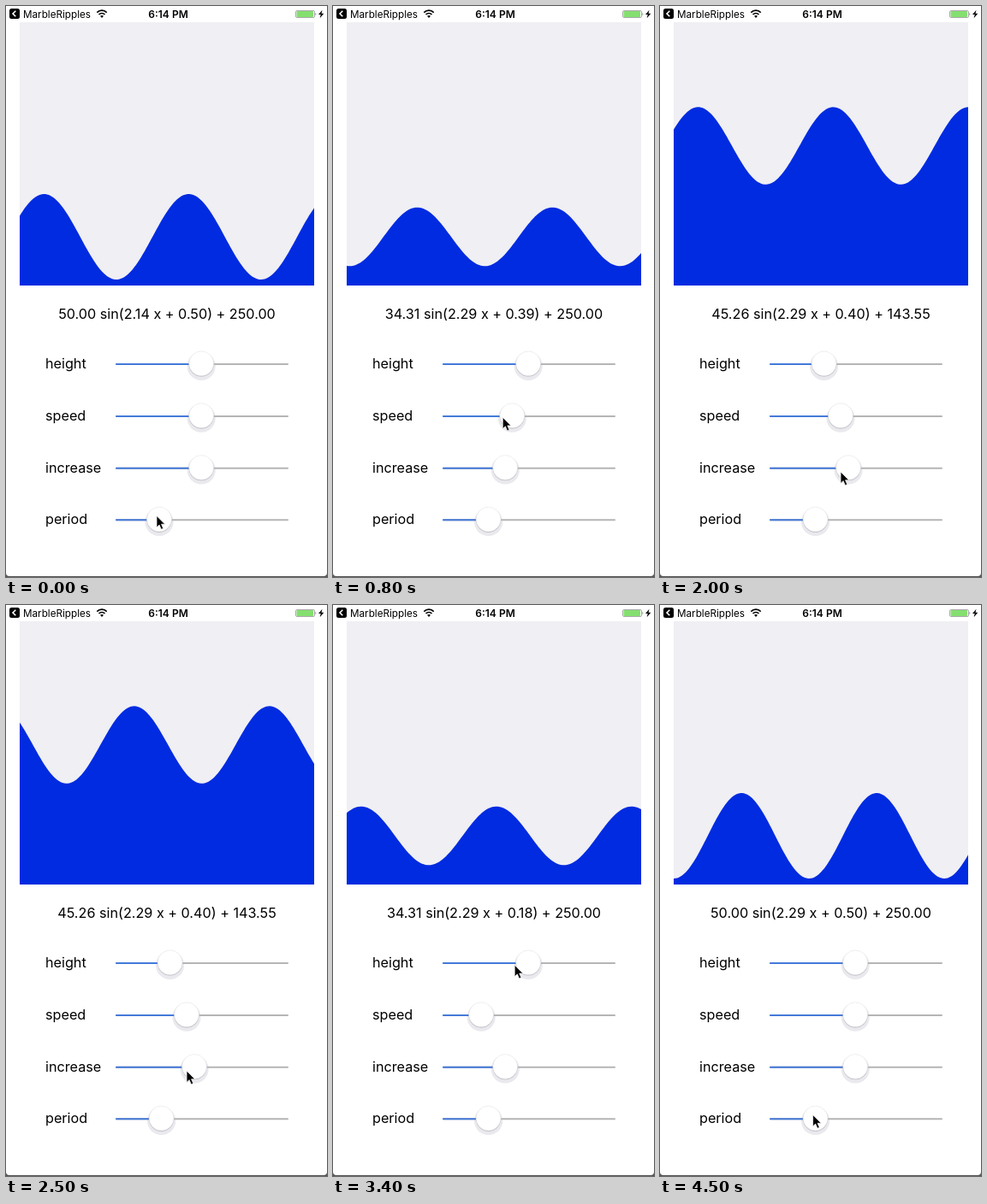
Recreate the animation shown at these times as an HTML page. Size 375 by 668 pixels, loop 4600 ms.

```html
<!DOCTYPE html>
<html lang="en">
<head>
<meta charset="utf-8">
<title>Sine wave controls</title>
<style>
  html, body { margin: 0; width: 100%; height: 100%; overflow: hidden; background: #fff; }
  svg { display: block; width: 375px; height: 668px; }
  text { font-family: Inter, Roboto, sans-serif; font-size: 16.2px; }
</style>
</head>
<body>
<svg viewBox="0 0 375 668">
  <!-- status bar -->
  <rect x="4" y="3" width="12" height="12" rx="2.5"/>
  <path d="M11.3 5.8 8 9l3.3 3.2" fill="none" stroke="#fff" stroke-width="1.6"/>
  <text x="20" y="13.5" style="font-size:11.7px">MarbleRipples</text>
  <path d="M106.3 7.6a8 8 0 0 1 11.4 0M108.5 10a5 5 0 0 1 7 0" fill="none" stroke="#000" stroke-width="1.7"/>
  <path d="M112 14l-2-2.2a3 3 0 0 1 4 0z"/>
  <text x="189.5" y="13.5" text-anchor="middle" style="font-size:12px;font-weight:600">6:14 PM</text>
  <rect x="338.5" y="5.5" width="22" height="8" rx="1.5" fill="#fff" stroke="#aaa"/>
  <rect x="339.5" y="6" width="19.5" height="7" rx="1" fill="#85df70"/>
  <path d="M361.5 7.7q1.6 1.8 0 3.6z" fill="#666"/>
  <path d="M369.5 4.8 365 10h2.7l-1 4.2 4.6-5.4h-2.8z"/>

  <!-- chart -->
  <rect x="16" y="19" width="344" height="308" fill="#efeff4"/>
  <path id="wave" fill="#002be0"/>
  <text id="formula" x="188" y="366" text-anchor="middle"></text>

  <g id="controls"></g>
  <path id="cursor" d="M0 0v13.4l3.1-2.9 2.2 5.2 2.4-1-2.2-5h4.2z" stroke="#fff" stroke-width=".7"/>

  <!-- screen edge -->
  <path d="M0 663q0 4 4 4h367q4 0 4-4v5H0z" fill="#555"/>
</svg>
<script>
const STEP = 100, STEPS = 46;
const $ = id => document.getElementById(id);

const sliders = {
  height: { y: 418.3, max: 500, start: 250 },
  speed: { y: 479.2, max: 1, start: .5 },
  increase: { y: 540, max: 100, start: 50 },
  period: { y: 600.5, max: 10, start: 2.14 }
};

// Each drag takes a slider to a value between two steps; grab is the pointer's offset from the thumb.
const drag = (name, from, to, value, ...grab) => ({ name, from, to, value, grab });
const drags = [
  drag('period', 0, 1, 2.29, -3, -4),
  drag('increase', 2, 3.75, 34.31, -10, 5),
  drag('speed', 4.25, 8, .39, -11, 2),
  drag('speed', 8, 10.9, .18, -11, 2),
  drag('height', 12, 13.7677, 143.55, -16, 3),
  drag('speed', 15, 16, .24, -12, -6),
  drag('speed', 16, 19.4, .4, -12, -6),
  drag('increase', 19.6, 20, 45.26, -9, 5)
];

const progress = (t, from, to) => Math.min(1, Math.max(0, (t - from) / (to - from)));
const lerp = (a, b, p) => a + (b - a) * p;

function valueAt(name, t) {
  return drags.filter(d => d.name === name).reduce(
    (v, d) => lerp(v, d.value, progress(t, d.from, d.to)), sliders[name].start);
}

const thumbX = (name, t) => 142.2 + 172 * valueAt(name, t) / sliders[name].max;

function grip(d, t) {
  return [thumbX(d.name, t) + d.grab[0], sliders[d.name].y + d.grab[1]];
}

function cursorAt(t) {
  const i = drags.findIndex(d => t <= d.to);
  if (i < 0) return grip(drags[drags.length - 1], t);
  const next = drags[i], last = drags[i - 1];
  if (t >= next.from) return grip(next, t);
  const a = grip(last, last.to), b = grip(next, next.from);
  return a.map((v, k) => lerp(v, b[k], progress(t, last.to, next.from)));
}

// The wave advances by the current speed, so its phase is the speed summed over time.
function phaseAt(t) {
  const dt = .05;
  let phase = 29.5;
  for (let i = 0; i < Math.round(t / dt); i++) phase += 1200 * dt * valueAt('speed', (i + .5) * dt);
  return phase;
}

function wavePath(t) {
  const amp = valueAt('increase', t), mid = 20 + valueAt('height', t);
  const freq = .9955 * valueAt('period', t), phase = phaseAt(t);
  let d = 'M16 327';
  for (let x = 0; x <= 344; x += 2) {
    const y = mid - amp * Math.sin((freq * x + phase) * Math.PI / 180);
    d += `L${x + 16} ${y.toFixed(2)}`;
  }
  return d + 'V327z';
}

$('controls').innerHTML = Object.entries(sliders).map(([name, { y }]) => `
  <text x="46" y="${y + 5.6}">${name}</text>
  <circle class="${name}" cy="${y + 3}" r="16.6" fill="#e9e9ee"/>
  <rect x="128" y="${y - .3}" width="202" height="2" rx="1" fill="#b5b5b5"/>
  <rect id="${name}Fill" x="128" y="${y - .3}" height="2" rx="1" fill="#447ad9"/>
  <circle class="${name}" cy="${y + .7}" r="14.5" fill="#b4b4ba"/>
  <circle class="${name}" cy="${y}" r="14.4" fill="#fff" stroke="#dedee2" stroke-width=".5"/>`).join('');

function draw(t) {
  $('wave').setAttribute('d', wavePath(t));
  const [height, speed, amp, freq] = Object.keys(sliders).map(name => valueAt(name, t).toFixed(2));
  $('formula').textContent = `${amp} sin(${freq} x + ${speed}) + ${height}`;
  for (const name in sliders) {
    const x = thumbX(name, t);
    $(name + 'Fill').setAttribute('width', x - 128);
    document.querySelectorAll('.' + name).forEach(c => c.setAttribute('cx', x));
  }
  $('cursor').setAttribute('transform', `translate(${cursorAt(t)})`);
}

// The second half of the loop plays the first half backwards.
const start = performance.now();
function tick() {
  const step = Math.floor(Math.max(0, performance.now() - start) / STEP) % STEPS;
  draw(Math.min(step, STEPS - step));
  requestAnimationFrame(tick);
}
tick();
</script>
</body>
</html>
```
